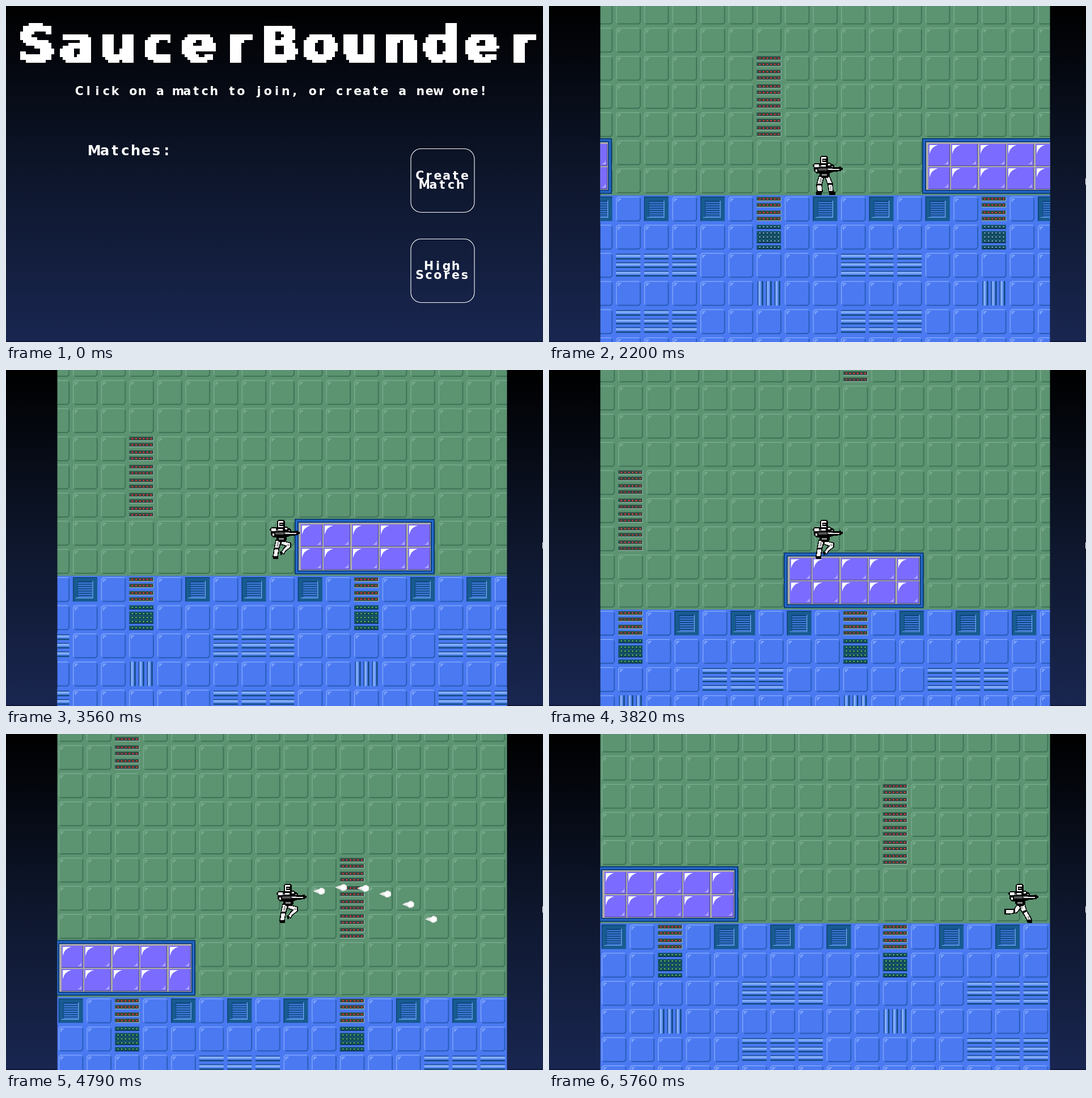
These frames come from a looping animation (947x592 px, 5.83 s). An HTML page:

```html
<!DOCTYPE html>
<html lang="en">
<head>
<meta charset="utf-8">
<title>SaucerBounder</title>
<style>
html, body { margin: 0; width: 100%; height: 100%; overflow: hidden; background: #000; }
svg { display: block; width: 947px; height: 592px; }
text { fill: #fff; font: bold 20.5px "DejaVu Sans", sans-serif; text-anchor: middle; }
#menu .big { font-size: 89px; }
#menu .list { font-size: 24px; }
</style>
</head>
<body>
<svg viewBox="0 0 947 592" xmlns="http://www.w3.org/2000/svg">
  <defs>
    <linearGradient id="sky" x2="0" y2="1">
      <stop offset="0" stop-color="#000"/><stop offset=".12" stop-color="#03050a"/>
      <stop offset=".5" stop-color="#0d162b"/><stop offset="1" stop-color="#192650"/>
    </linearGradient>
    <filter id="blocky" filterUnits="userSpaceOnUse" x="0" y="0" width="947" height="592" color-interpolation-filters="sRGB">
      <feMorphology in="SourceGraphic" operator="dilate" radius="3 0" result="wide"/>
      <feFlood x="2" y="2" width="1" height="1" flood-color="#fff"/>
      <feOffset x="0" y="0" width="5" height="5"/>
      <feTile result="grid"/>
      <feComposite in="wide" in2="grid" operator="in"/>
      <feMorphology operator="dilate" radius="2"/>
      <feComponentTransfer><feFuncA type="discrete" tableValues="0 1"/></feComponentTransfer>
    </filter>
    <clipPath id="view"><rect x="90.5" width="793" height="592"/></clipPath>
    <pattern id="greenTile" patternUnits="userSpaceOnUse" x="118.2" y="38.3" width="49.6" height="49.6">
      <rect width="50" height="50" fill="#5c9371"/>
      <g fill="none" stroke-width="1.2"><path stroke="#7fb293" d="M.7 41V3.5L3.5 .7H41M4 9V4H9L6.5 5L5 6.5Z"/>
      <path stroke="#2d5f48" d="M42.7 3V40L40 42.7H3"/></g>
    </pattern>
    <pattern id="blueTile" patternUnits="userSpaceOnUse" x="118.2" y="335.9" width="49.6" height="49.6">
      <rect width="50" height="50" fill="#4a79f1"/>
      <g fill="none" stroke-width="1.2"><path stroke="#8cb0ff" d="M.7 41V3.5L3.5 .7H41M4 9V4H9L6.5 5L5 6.5Z"/>
      <path stroke="#134a94" d="M42.7 3V40L40 42.7H3"/></g>
    </pattern>
    <g id="strip">
      <rect width="43" height="7" fill="#35584f"/>
      <path d="M0 7H43V0" fill="none" stroke="#a3bdb4" stroke-width="1"/>
      <path d="M3 3.6H41" stroke="#1d2f2e" stroke-width="3.8" stroke-dasharray="5 1.6"/>
    </g>
    <g id="lamps"></g>
    <g id="panel">
      <path d="M0 0H43V7H0ZM0 11H43V32H0ZM0 36H43V43H0Z" fill="#17566f"/>
      <path d="M0 7H43M0 32H43M0 43H43" stroke="#0c3358" stroke-width="1.2"/>
      <path d="M3 4H41M3 15H41M3 22H41M3 29H41M3 40H41" stroke="#0b3340" stroke-width="4" stroke-dasharray="5 1.6"/>
      <path class="dot" d="M4.3 3.6H41M4.3 14.6H41M4.3 21.6H41M4.3 28.6H41M4.3 39.6H41" stroke-width="2" stroke-dasharray="2.6 4"/>
    </g>
    <g id="vent">
      <rect width="43" height="43" fill="#175b90"/>
      <path d="M.6 43V.6H43" fill="none" stroke="#0d3f6e" stroke-width="1.3"/>
      <rect x="8" y="7" width="27" height="30" fill="#114682"/>
      <path d="M9 10.5H34M9 14.5H34M9 18.5H34M9 22.5H34M9 26.5H34M9 30.5H34M9 34.5H34" stroke="#4584e4" stroke-width="1.8"/>
      <path d="M5 36.6H35V7" fill="none" stroke="#7fb2ff" stroke-width="1.2"/>
    </g>
    <linearGradient id="tube" x2="0" y2="1">
      <stop offset="0" stop-color="#113f7c"/><stop offset=".14" stop-color="#2a62b8"/><stop offset=".25" stop-color="#9bbdff"/>
      <stop offset=".5" stop-color="#6f9dfb"/><stop offset=".72" stop-color="#4379e4"/><stop offset=".8" stop-color="#124a7e"/><stop offset="1" stop-color="#124a7e"/>
    </linearGradient>
    <g id="bars" fill="url(#tube)"><rect y="1.5" width="43" height="10"/><rect y="16.5" width="43" height="10"/><rect y="31.5" width="43" height="10"/></g>
    <g id="bolt"><path d="M-11 0L-5 -3L0 -4L2 -6H6L10 -3V3L7 5L5 6H1L-1 4L-6 2Z" fill="#e4e6e4"/><path d="M-3 -1L2 -4H6L9 -2V2L5 4H1Z" fill="#fff"/></g>
  </defs>

  <rect width="947" height="592" fill="url(#sky)"/>
  <rect y="590.5" width="947" height="1.5" fill="#0b1230"/>

  <g id="menu">
    <g filter="url(#blocky)"><text class="big" data-mid="482.3" data-pitch="71.3" y="98">SaucerBounder</text></g>
    <text data-mid="485.5" data-pitch="15.83" y="157">Click on a match to join, or create a new one!</text>
    <text class="list" data-mid="219.5" data-pitch="18.2" y="263">Matches:</text>
    <g fill="none" stroke="#fff" stroke-width="1.1">
      <rect x="714" y="251.5" width="112" height="112" rx="18"/>
      <rect x="714" y="410.5" width="112" height="112" rx="18"/>
    </g>
    <text data-mid="769.3" data-pitch="15.83" y="306">Create</text>
    <text data-mid="769.3" data-pitch="15.83" y="322">Match</text>
    <text data-mid="769.3" data-pitch="15.83" y="465">High</text>
    <text data-mid="769.3" data-pitch="15.83" y="481">Scores</text>
  </g>

  <g id="game" clip-path="url(#view)">
    <rect x="90" width="794" height="592"/>
    <g id="scene">
      <g id="world"></g>
      <g id="bolts"></g>
      <g id="hero" shape-rendering="crispEdges">
        <g id="legs0">
          <path d="M13 37H22L18 52L19 64H10L9 52ZM23 36H31L37 50L38 64H31L29 52Z" fill="#f2f2f2" stroke="#000" stroke-width="1.5"/>
          <path d="M9 50H18V53H9ZM29 49H37V52H29ZM8 64H18V70H8ZM31 64H42V70H31Z"/>
          <path d="M15 40H18V48H14ZM33 54H35V62H33Z" fill="#a8a8a8"/>
        </g>
        <g id="legs1">
          <path d="M13 37H22L18 54L16 66H8L10 52ZM22 36L32 40L39 42V49L30 56L27 61L22 59L27 51L31 47L22 44Z" fill="#f2f2f2" stroke="#000" stroke-width="1.5"/>
          <path d="M10 50H18V53H10ZM8 65H17V70H8ZM20 56L25 58L24 63H21Z"/>
          <path d="M15 40H18V48H14ZM33 44H37V47H33Z" fill="#a8a8a8"/>
        </g>
        <g id="legs2">
          <path d="M19 36L25 42L17 52L4 54H-4V46H5L12 46ZM20 36L31 37L34 48L40 58L43 64L36 66L30 56L24 47Z" fill="#f2f2f2" stroke="#000" stroke-width="1.5"/>
          <path d="M-5 45H-2V55H-5ZM11 45H14V53H11ZM27 49L34 47V50L29 53ZM34 64H44V70H36Z"/>
          <path d="M24 39H27V45H24ZM36 58H39V63H36Z" fill="#a8a8a8"/>
        </g>
        <path d="M14 30H32V37L28 40H18L14 36ZM2 17L6 14H14L20 13L32 13L40 18V29L30 32H8L4 27V20H2ZM15 3L18 1H26L29 4V15H15Z"/>
        <path d="M17 3H26V6H19V12H26V14H17ZM5 16H13V21H5ZM17 17H25V20H17ZM7 25H10V29H7ZM29 15H33V18H29Z" fill="#fff"/>
        <path d="M20 8H25V10H20ZM18 33H27V36H18ZM35 19H38V22H35ZM14 18H16V21H14Z" fill="#8d8d8d"/>
        <path d="M10 21H48V20H52V22H55V26H52V28H46V29H10Z"/>
        <path d="M12 23H27V27H12Z" fill="#555"/>
        <path d="M28 23H37V26H28Z" fill="#8f8f8f"/>
        <path d="M30 24H49V26H30Z" fill="#e2e2e2"/>
      </g>
    </g>
  </g>
  <path id="cursor" d="M0 0V12L3 9.5L5 14L7 13L5 9H8Z" fill="#fff"/>
</svg>
<script>
const $ = id => document.getElementById(id);
const LOOP = 5830, TILE = 49.6, LEFT = 118.2, FLOOR = 335.9, CAM_MAX = 571;
const GREEN = '#5c9371', BLUE = '#4a79f1';
const range = (a, b) => Array.from({ length: b - a + 1 }, (_, i) => a + i);
const put = (id, x, y) => `<use href="#${id}" x="${x.toFixed(1)}" y="${y.toFixed(1)}"/>`;

// Piecewise linear lookup through [input, ...values] points
function track(points, v) {
  if (v <= points[0][0]) return points[0].slice(1);
  for (let i = 1; i < points.length; i++) {
    const a = points[i - 1], b = points[i];
    if (v <= b[0]) {
      const k = (v - a[0]) / (b[0] - a[0]);
      return a.slice(1).map((p, j) => p + (b[j + 1] - p) * k);
    }
  }
  return points[points.length - 1].slice(1);
}

// Centre each letter in an equally wide cell
function spread(el) {
  const { mid, pitch } = el.dataset, last = el.textContent.length - 1;
  el.setAttribute('x', range(0, last).map(i => (+mid + (i - last / 2) * pitch).toFixed(1)).join(' '));
}

function windowArt(x, y) {
  const frame = (d, c) => `<rect x="${d}" y="${d}" width="${247 - 2 * d}" height="${98 - 2 * d}" fill="${c}"/>`;
  let s = frame(0, '#0d3d78') + frame(2, '#2569cc') + frame(5, '#0e3c7c') + frame(7, '#aeaca9');
  const panes = [[11, 37], [51, 46], [101, 46], [150, 46], [200, 38]];
  for (const py of [10, 51]) for (const [px, w] of panes) {
    s += `<g transform="translate(${px} ${py})"><path d="M0 0H${w + 1}V39H0Z" fill="#4b478c"/>
      <path d="M0 0H${w}V38H0Z" fill="#7b6cff"/>
      <path d="M2 2H17Q5 5 2 18Z" fill="#fff"/>
      <path d="M${w - 2} 29V36H${w - 9}Q${w - 4} 34 ${w - 2} 29" fill="#b4aaff"/></g>`;
  }
  return `<g transform="translate(${x} ${y})">${s}</g>`;
}

function build() {
  document.querySelectorAll('#menu text').forEach(spread);
  $('lamps').innerHTML = [0, 11, 24, 35].map((y, i) => put('strip', 0, y + .4) +
    `<path class="lamp${i % 2}" d="M4.2 ${y + 4}H41" stroke-width="2.4" stroke-dasharray="2.8 3.8"/>`).join('');

  let s = `<rect x="60" y="-170" width="1420" height="504" fill="url(#greenTile)"/>
    <rect x="60" y="333.5" width="1420" height="300" fill="url(#blueTile)"/>`;
  const row = k => FLOOR + k * TILE;
  const plain = (x, y, c) => `<rect x="${x - 2.5}" y="${y - 2}" width="48" height="48" fill="${c}"/>`;
  const cell = (id, x, k, c = BLUE) => plain(x, row(k), c) + put(id, x, row(k));
  for (const i of range(-1, 27)) {
    const x = LEFT + i * TILE, m = (i + 8) % 8;
    if (m === 5) {
      const top = (i - 5) % 16 ? -11 : -5;
      for (const k of range(top, top + 2)) s += cell('lamps', x, k, GREEN);
      s += cell('lamps', x, 0) + cell('panel', x, 1) + plain(x, row(3), BLUE) +
        `<use href="#bars" transform="translate(${x} ${row(3) + 43}) rotate(-90)"/>`;
    } else if (m % 2) s += cell('vent', x, 0);
    if (m < 3) s += cell('bars', x, 2) + cell('bars', x, 4);
  }
  s += windowArt(-136, 233) + windowArt(658, 233);
  $('world').innerHTML = s;
  $('bolts').innerHTML = '<use href="#bolt"/>'.repeat(8);
}

const runX = n => track([[-1, 0], [0, 6], [6, 149], [15, 363], [24, 583], [38, 916]], n)[0];
const jumpY = n => Math.max(0, 145 - .66 * (n - 19.25) ** 2);
const show = (el, on) => el.setAttribute('visibility', on ? 'inherit' : 'hidden');
const move = (el, x, y) => el.setAttribute('transform', `translate(${x.toFixed(1)} ${y.toFixed(1)})`);
const paint = (cls, c) => document.querySelectorAll(cls).forEach(el => el.setAttribute('stroke', c));

function drawCursor(t) {
  const [x, y] = track([[320, 908, 580], [460, 866, 450], [600, 800, 300], [690, 776, 258], [880, 761, 289],
    [1360, 761, 289], [1630, 946, 303]], t);
  show($('cursor'), t >= 320);
  move($('cursor'), x, y);
}

function drawGame(t) {
  const n = t < 3140 ? -1 : Math.floor((t - 3125) / 68.5);
  const x = runX(n), cam = Math.min(x, CAM_MAX), up = jumpY(n);
  move($('world'), -cam, up);
  move($('hero'), 463 + x - cam, 263);

  const pose = n < 0 ? 0 : up > 0 ? 1 : n % 4 >= 2 ? 2 : 1;
  range(0, 2).forEach(i => show($('legs' + i), i === pose));

  [...$('bolts').children].forEach((bolt, i) => {
    const shot = 10 + 2.5 * i, age = n - shot;
    show(bolt, age > .5);
    move(bolt, runX(shot) + 517 + 40 * age - cam, 285 + up - jumpY(shot));
  });

  const beat = n >= 0 && Math.floor(n / 3) % 2;
  paint('.lamp0', beat ? '#ec5045' : '#e2443a');
  paint('.lamp1', beat ? '#b94a40' : '#dd4a3f');
  paint('.dot', n < 0 ? '#7fb9dc' : '#62cf6c');
}

function frame(now) {
  const t = now % LOOP;
  show($('menu'), t < 950);
  show($('game'), t >= 950);
  show($('scene'), t >= 1360);
  drawCursor(t);
  drawGame(t);
}

build();
const start = performance.now();
frame(0);
requestAnimationFrame(function tick() {
  frame(performance.now() - start);
  requestAnimationFrame(tick);
});
</script>
</body>
</html>
```
